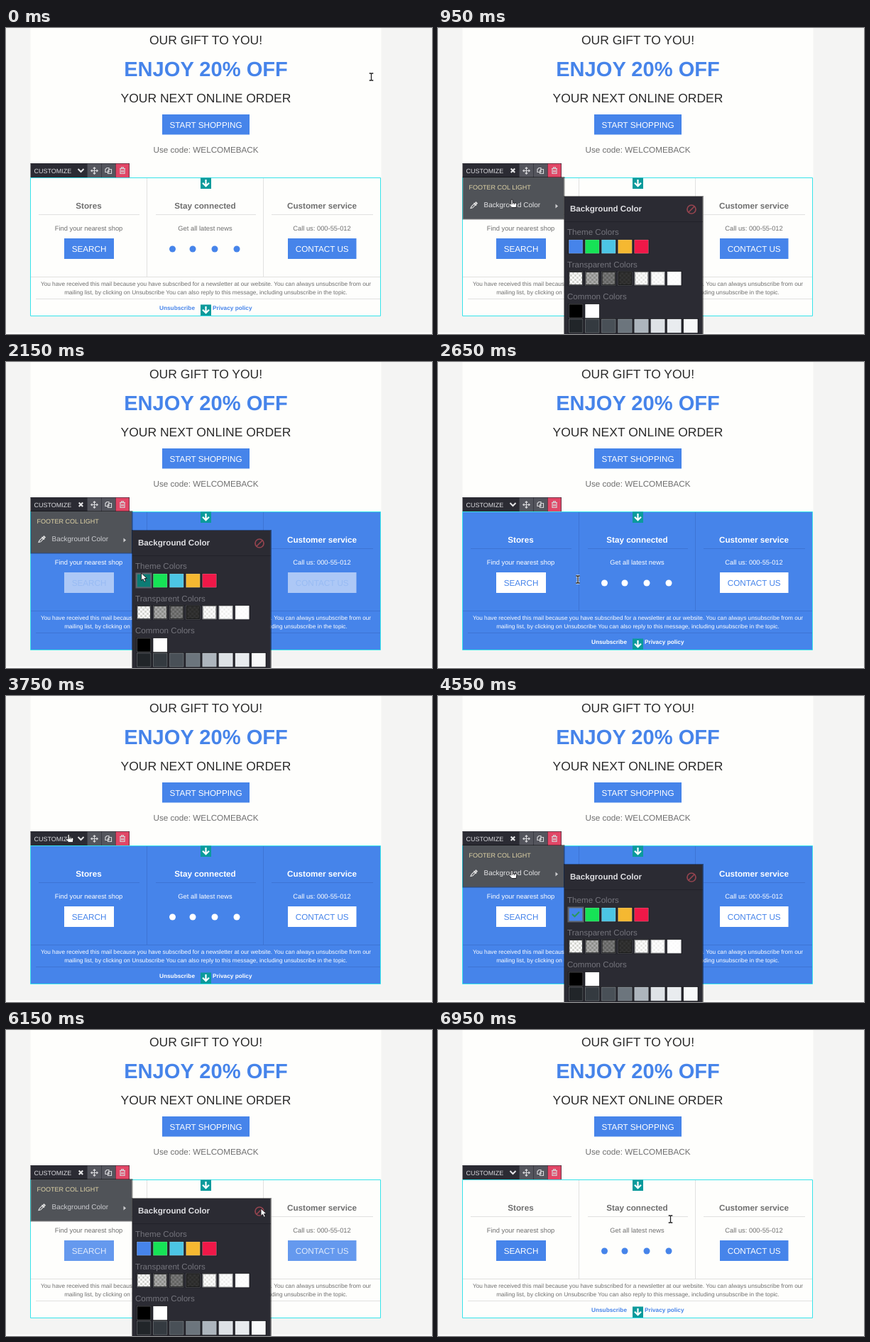
An HTML page for the animation above (7.15 s loop, 600 by 432 pixels).

```html
<!DOCTYPE html>
<html lang="en">
<head>
<meta charset="utf-8">
<title>Footer background colour</title>
<style>
html, body { margin: 0; width: 100%; height: 100%; overflow: hidden; background: #f4f4f3; }
svg { display: block; width: 600px; height: 432px; font-family: "Liberation Sans", Arial, sans-serif; text-rendering: geometricPrecision; }
.mid { text-anchor: middle; }
.big { font-size: 17.5px; fill: #2b2b2b; }
.btn, .lead { font-size: 11.7px; }
.small { font-size: 9.35px; }
.fine { font-size: 8.26px; }
.bold { font-weight: bold; }
.foot { fill: var(--text); }
.link { fill: var(--link); }
.lines { stroke: var(--line); fill: none; }
.face { fill: var(--face); }
.label { fill: var(--label); }
.icon { fill: none; stroke: #d5d5d8; stroke-width: 1.2; }
.group { font-size: 11.6px; fill: #74747c; }
</style>
</head>
<body>
<svg viewBox="0 0 600 432">
  <defs>
    <pattern id="checks" width="6" height="6" patternUnits="userSpaceOnUse">
      <path d="M0 0h6v6h-6z" fill="#fff"/><path d="M0 0h3v3h-3zM3 3h3v3h-3z" fill="#d6d7d2"/>
    </pattern>
    <g id="down">
      <path d="M0 0h15v15.500h-15z" fill="#0b9a9b"/>
      <path d="M7.500 2.500v9M3 7.200l4.500 4.500l4.500 -4.500" fill="none" stroke="#fff" stroke-width="2.200"/>
    </g>
  </defs>

  <path d="M0 430h600v2h-600z" fill="#fdfdfd"/>
  <path d="M34.500 0h494v211h-494z" fill="#fefefc"/>
  <g class="mid">
    <text class="big" x="281.500" y="23">OUR GIFT TO YOU!</text>
    <text class="bold" x="281.500" y="68" font-size="29.100" fill="#4684ea">ENJOY 20% OFF</text>
    <text class="big" x="281.500" y="104.500">YOUR NEXT ONLINE ORDER</text>
    <path d="M220 122h123v28.500h-123z" fill="#4684ea"/>
    <text class="btn" x="281.500" y="140.500" fill="#fff">START SHOPPING</text>
    <text class="lead" x="281.500" y="176.300" fill="#6f6f6f">Use code: WELCOMEBACK</text>
  </g>

  <g id="footer">
    <path d="M34.500 211.500h493v195h-493z" fill="var(--bg)"/>
    <path class="lines" d="M198.500 212v139M362.500 212v139M35 351.500h492M42 382.500h485M46 263.500h142M211 263.500h141M374 263.500h143"/>
    <path d="M34.500 211.500h493v195h-493z" fill="none" stroke="#36e3ea"/>
    <g class="mid foot">
      <g class="lead bold">
        <text x="116.500" y="254.500">Stores</text>
        <text x="280.500" y="254.500">Stay connected</text>
        <text x="445" y="254.500">Customer service</text>
      </g>
      <g class="small">
        <text x="116.500" y="285.500">Find your nearest shop</text>
        <text x="280.500" y="285.500">Get all latest news</text>
        <text x="445" y="285.500">Call us: 000-55-012</text>
      </g>
      <g class="fine">
        <text x="281.500" y="364">You have received this mail because you have subscribed for a newsletter at our website. You can always unsubscribe from our</text>
        <text x="281.500" y="375.500">mailing list, by clicking on Unsubscribe You can also reply to this message, including unsubscribe in the topic.</text>
      </g>
    </g>
    <path class="face" d="M82 297h70v29h-70zM397 297h96.500v29h-96.500z"/>
    <g class="mid btn label">
      <text x="117" y="315.700">SEARCH</text>
      <text x="445.200" y="315.700">CONTACT US</text>
    </g>
    <g class="link">
      <circle cx="234.500" cy="312" r="4.500"/><circle cx="263" cy="312" r="4.500"/>
      <circle cx="294" cy="312" r="4.500"/><circle cx="325" cy="312" r="4.500"/>
      <g class="fine bold">
        <text x="216" y="397.500">Unsubscribe</text>
        <text x="291" y="397.500">Privacy policy</text>
      </g>
    </g>
    <use href="#down" x="274" y="211.500"/>
    <use href="#down" x="274" y="390.500"/>
  </g>

  <g id="toolbar">
    <path d="M34.500 191h79.500v20h-79.500z" fill="#2b2b33"/>
    <path d="M114 191h40v20h-40z" fill="#54555d"/>
    <path d="M154 191h20v20h-20z" fill="#e14666"/>
    <path d="M34.500 191.500h139.500M114.500 191v20M134.500 191v20M154.500 191v20M173.500 191v20" stroke="#2b2b33" stroke-opacity=".6" fill="none"/>
    <text x="39.500" y="204.800" font-size="9" fill="#dcdce0">CUSTOMIZE</text>
    <path id="chevron" d="M101.500 199l4 4l4 -4" fill="none" stroke="#e4e4e6" stroke-width="2"/>
    <path id="close" d="M102.700 198.500l5.500 5.500M108.200 198.500l-5.500 5.500" stroke="#e4e4e6" stroke-width="2.200"/>
    <path class="icon" d="M120 201.500h9M124.500 197v9M122.800 198.500l1.700 -1.700l1.700 1.700M122.800 204.500l1.700 1.700l1.700 -1.700M121.500 199.800l-1.700 1.700l1.700 1.700M127.500 199.800l1.700 1.700l-1.700 1.700"/>
    <path class="icon" d="M140 199.500l2 -2h3v6h-5zM143.500 201.500l1.500 -2h3.500v6h-5z"/>
    <path class="icon" d="M160 198.500h8M162.500 198v-1.200h3v1.200M161 199v6.500h6v-6.500M163 200.500v3.500M165 200.500v3.500"/>
  </g>

  <g id="menu">
    <path d="M34.500 210h144v60.500h-144z" fill="#000" opacity=".45"/>
    <path d="M35.500 211h141.500v58.500h-141.500z" fill="#505358"/>
    <text x="43.500" y="228" font-size="9" fill="#dfd3a6">FOOTER COL LIGHT</text>
    <path d="M46 254.500l1 -2.500l4 -4l1.800 1.800l-4 4zM50.500 246.800l3.700 3.700" fill="none" stroke="#e8e8e8" stroke-width="1.100"/>
    <path d="M51.500 248.500l2 -2.500l1.500 1.500l-2.300 2.200z" stroke="#e8e8e8" stroke-width="1.400"/>
    <text id="entry" x="64.500" y="253" font-size="9.950">Background Color</text>
    <path d="M165.500 248.500l3.500 3l-3.500 3z" fill="#cfcfd2"/>
  </g>

  <g id="panel">
    <path d="M177 237h197v196h-197z" fill="#000" opacity=".45"/>
    <path d="M178 238h194.500v195h-194.500z" fill="#2b2b33"/>
    <path d="M178 273.500h194.500" stroke="#222229"/>
    <text class="bold" x="186" y="259.300" font-size="11.600" fill="#dedee2">Background Color</text>
    <circle cx="357" cy="256" r="6" fill="none" stroke="#94444f" stroke-width="1.700"/>
    <path d="M361.500 251.500l-9 9" stroke="#94444f" stroke-width="1.700"/>
    <text class="group" x="182" y="292">Theme Colors</text>
    <text class="group" x="182" y="338">Transparent Colors</text>
    <text class="group" x="182" y="383">Common Colors</text>
    <g id="swatches"></g>
    <path id="picked" d="M183.500 298.500h21v20h-21z" fill="none" stroke="#5d626c" stroke-width="2"/>
    <path id="tick" d="M189 308l3.500 3.300l6.500 -6.500" fill="none" stroke="#2a9a5c" stroke-width="2"/>
  </g>

  <g id="pointer">
    <g id="beam" fill="none">
      <path d="M-2.500 -5h5M0 -5v10M-2.500 5h5" stroke="#fff" stroke-width="2.800"/>
      <path d="M-2.800 -5h2l.8 .8l.8 -.8h2M0 -4.500v9M-2.800 5h2l.8 -.8l.8 .8h2" stroke="#222" stroke-width="1.300"/>
    </g>
    <path id="arrow" d="M0 0v10.500l2.500 -2.200l1.800 4l2 -.9l-1.800 -3.900h3.500z" fill="#fff" stroke="#15151a" stroke-width=".9"/>
    <path id="hand" transform="scale(1.150)" d="M-1 .5q1 -1 2 0v3.300l4 .7q1 .4 1 1.500l-.7 4h-5.300l-3.500 -3.700q0 -1.300 1.300 -1l1.200 .9zM1 4v2M3 4.400v1.800" fill="#fff" stroke="#15151a" stroke-width=".8"/>
  </g>
</svg>
<script>
const LOOP = 7150, STEP = 50;
const el = id => document.getElementById(id);
const show = (id, on) => el(id).setAttribute('visibility', on ? 'visible' : 'hidden');
const within = (t, ...spans) => spans.some(([from, to]) => t >= from && t < to);

// Swatch rows: top edge and fills
const rows = [
  [299, '#4684ea #16e356 #4cc5e4 #f5b831 #f01848'],
  [344, '#0000 #0005 #0008 #000c #fff6 #fffa #ffffffe6'],
  [390, '#000 #fff'],
  [411, '#212529 #343a40 #495057 #6c757d #adb5bd #dee2e6 #e9ecef #f8f9fa']
];
el('swatches').innerHTML = rows.map(([y, fills]) => fills.split(' ').map((fill, i) => {
  const box = `x="${184.3 + 23.1 * i}" y="${y}" width="19.600" height="19.200"`;
  return `<rect ${box} fill="url(#checks)" stroke="#101014" stroke-width="2"/>
    <rect ${box} fill="${fill}" stroke="#d8dce0" stroke-opacity=".45" stroke-width=".7"/>`;
}).join('')).join('');
const firstSwatch = el('swatches').children[1];

// Pointer stops: time, x, y
const path = [
  [0, 514.5, 69], [550, 90, 197], [750, 90, 199], [950, 104, 242], [1400, 166, 245],
  [1600, 180, 256], [2150, 190.5, 298], [2350, 195, 306], [2650, 197, 307],
  [3100, 217, 299], [3200, 243.5, 285], [3350, 243.5, 285], [3700, 88, 195], [4100, 89, 196],
  [4400, 100, 243], [4550, 104, 246], [4950, 172, 249], [5450, 314.5, 258.5],
  [5700, 339, 256], [5800, 359, 252], [6200, 359, 252], [6700, 155, 296],
  [6950, 327.5, 267], [LOOP, 327.5, 267]
];
const shapes = [[0, 'beam'], [500, 'hand'], [1600, 'arrow'], [2650, 'beam'], [3600, 'hand'], [5000, 'arrow'], [6200, 'beam']];

function pointerAt(t) {
  const i = path.findIndex(p => p[0] > t);
  const [t0, x0, y0] = path[i - 1], [t1, x1, y1] = path[i];
  const k = (t - t0) / (t1 - t0);
  return [x0 + (x1 - x0) * k, y0 + (y1 - y0) * k];
}

const BLUE = [70, 132, 234], WHITE = [255, 255, 255];
const mix = (a, b, k) => `rgb(${a.map((v, i) => Math.round(v + (b[i] - v) * k))})`;
const clamp = v => Math.max(0, Math.min(1, v));

function draw(t) {
  const blue = within(t, [2050, 6000]);
  const open = within(t, [650, 2650], [3900, 6200]);
  const panel = within(t, [950, 2650], [4350, 6200]);
  const hover = panel && within(t, [2050, 2650]);
  const chosen = panel && within(t, [4000, 6000]);
  const fade = clamp((t - 2050) / 180) - clamp((t - 6000) / 180);

  const colours = {
    bg: blue ? '#4684ea' : '#fefefc', text: blue ? '#fff' : '#6f6f6f',
    link: blue ? '#fff' : '#4684ea', line: blue ? '#3d74d4' : '#e1e1e0',
    face: mix(BLUE, WHITE, fade), label: mix(WHITE, BLUE, fade)
  };
  for (const name in colours) el('footer').style.setProperty('--' + name, colours[name]);

  show('menu', open);
  show('close', open);
  show('chevron', !open);
  show('panel', panel);
  show('picked', hover || chosen);
  show('tick', chosen);
  firstSwatch.setAttribute('fill', hover ? '#0c7c74' : '#4684ea');
  el('entry').setAttribute('fill', within(t, [900, 1600], [4300, 5000]) ? '#e6e6e8' : '#cbccd0');

  const shape = shapes.filter(s => s[0] <= t).pop()[1];
  for (const id of ['beam', 'arrow', 'hand']) show(id, id === shape);
  el('pointer').setAttribute('transform', `translate(${pointerAt(t)})`);
}

const start = performance.now();
function tick() {
  const t = (performance.now() - start) % LOOP;
  draw(Math.floor(t / STEP) * STEP);
  requestAnimationFrame(tick);
}
tick();
</script>
</body>
</html>
```
